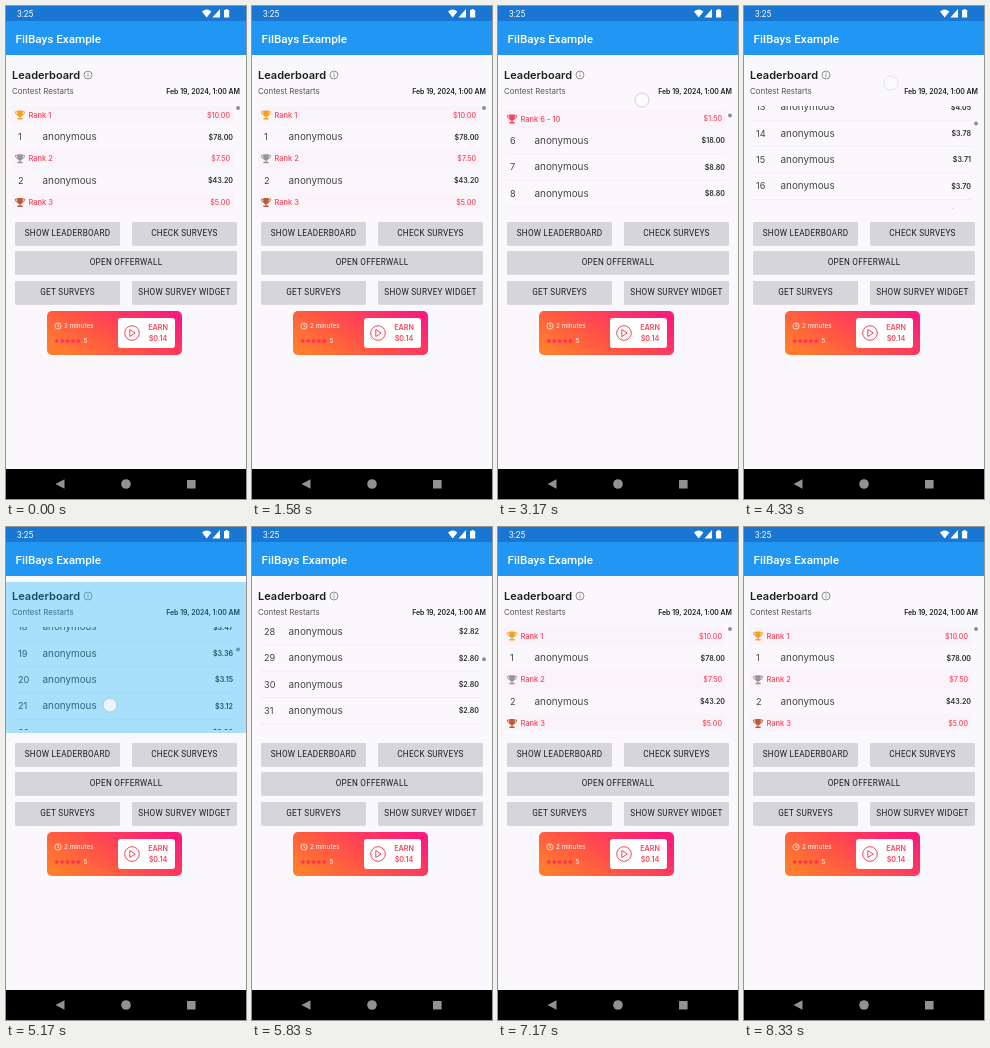
An HTML page for the animation above (8.41 s loop, 240x493 px).

```html
<!DOCTYPE html>
<html lang="en">
<head>
<meta charset="utf-8">
<title>Leaderboard</title>
<style>
@property --s { syntax: "<number>"; inherits: true; initial-value: 0; }
html, body { margin: 0; width: 100%; height: 100%; overflow: hidden; background: #faf8fd; }
svg { display: block; width: 240px; height: 493px; font-family: Inter, "Open Sans", sans-serif; }
.roboto { font-family: Roboto, sans-serif; }
.end { text-anchor: end; }
.mid { text-anchor: middle; }
.bold { font-weight: 600; }

#board, #press, #touch { animation: 8410ms linear infinite; }
#board { animation-name: scroll; }
#press { animation-name: press; }
#touch { animation-name: touch; }
#list { transform: translateY(calc(var(--s) * -1px)); }
#thumb { transform: translateY(calc(var(--s) * .0375px)); }

/* drag, then fling with deceleration */
@keyframes scroll {
  0%, 21.4% { --s: 0; }
  23.8% { --s: 84; animation-timing-function: cubic-bezier(.15,.6,.4,1); }
  28%, 34.5% { --s: 113; }
  37.7% { --s: 197; animation-timing-function: cubic-bezier(.15,.6,.4,1); }
  45.2%, 48.5% { --s: 315; }
  51.5% { --s: 416; animation-timing-function: cubic-bezier(.15,.6,.4,1); }
  59.5%, 62.4% { --s: 549; }
  65.2% { --s: 650; animation-timing-function: cubic-bezier(.15,.6,.4,1); }
  74.3%, 77.7% { --s: 839; }
  79.7% { --s: 664; animation-timing-function: cubic-bezier(.2,.45,.6,1); }
  83%, 100% { --s: 0; }
}
@keyframes press {
  0%, 19.6% { opacity: 0; }
  21%, 21.6% { opacity: .33; }
  23%, 32.7% { opacity: 0; }
  34.1%, 34.7% { opacity: .33; }
  36.1%, 46.7% { opacity: 0; }
  48.1%, 48.7% { opacity: .33; }
  50.1%, 60% { opacity: 0; }
  61.3%, 62.6% { opacity: .33; }
  64%, 75.8% { opacity: 0; }
  77.3%, 77.7% { opacity: .25; }
  79%, 100% { opacity: 0; }
}
@keyframes touch {
  0%, 19.5% { transform: translate(104px,178px); opacity: 0; }
  20%, 21.4% { transform: translate(104px,178px); opacity: 1; }
  23.8% { transform: translate(142px,94px); opacity: 1; }
  25%, 32.6% { transform: translate(145px,82px); opacity: 0; }
  32.61% { transform: translate(106px,178px); opacity: 0; }
  33.1%, 34.5% { transform: translate(106px,178px); opacity: 1; }
  37.7% { transform: translate(144px,94px); opacity: .8; }
  38.9%, 46.6% { transform: translate(148px,80px); opacity: 0; }
  46.61% { transform: translate(106px,178px); opacity: 0; }
  47.1%, 48.5% { transform: translate(106px,178px); opacity: 1; }
  50.8% { transform: translate(145px,84px); opacity: .9; }
  51.5% { transform: translate(147px,77px); opacity: .4; }
  52.2%, 59.8% { transform: translate(148px,74px); opacity: 0; }
  59.81% { transform: translate(104px,178px); opacity: 0; }
  60.4%, 62.4% { transform: translate(104px,178px); opacity: 1; }
  65.2% { transform: translate(145px,78px); opacity: .8; }
  66.3%, 75.6% { transform: translate(148px,70px); opacity: 0; }
  75.61% { transform: translate(118px,189px); opacity: 0; }
  76.2%, 77.7% { transform: translate(118px,189px); opacity: 1; }
  79.7% { transform: translate(126px,364px); opacity: .8; }
  80.9%, 100% { transform: translate(127px,370px); opacity: 0; }
}
</style>
</head>
<body>
<svg viewBox="0 0 240 493">
  <defs>
    <linearGradient id="warm" x1="0" y1=".75" x2="1" y2=".25">
      <stop offset="0" stop-color="#ff7d2c"/>
      <stop offset=".45" stop-color="#ff5148"/>
      <stop offset="1" stop-color="#fc1c7c"/>
    </linearGradient>
    <clipPath id="view"><rect y="100" width="240" height="103"/></clipPath>
    <filter id="shade" x="-5%" y="-10%" width="110%" height="130%">
      <feDropShadow dx="0" dy=".8" stdDeviation=".7" flood-opacity=".3"/>
    </filter>
    <g id="cup">
      <path d="M-2.8-4.5h5.6v3.4a2.8 2.8 0 0 1-5.6 0zM-.6 1h1.2v2h2v1.5h-5.2V3h2z"/>
      <path d="M-2.8-3.3h-1.8q0 3.1 2.3 3.3M2.8-3.3h1.8q0 3.1-2.3 3.3" fill="none" stroke="currentColor" stroke-width=".9"/>
    </g>
    <path id="star" d="M0-2.7.7-.9 2.6-.8 1.1.4 1.6 2.2 0 1.2-1.6 2.2-1.1.4-2.6-.8-.7-.9z"/>
  </defs>

  <rect width="240" height="493" fill="#faf8fd"/>

  <g class="roboto" fill="#fff" font-weight="500">
    <rect width="240" height="15" fill="#1976d2"/>
    <rect y="15" width="240" height="34" fill="#2196f3"/>
    <text x="11" y="10.8" font-size="8.4" font-weight="400">3:25</text>
    <path d="M196 5.4q4.7-4 9.4 0l-4.7 6zM214 3v8.4h-7.6zM218 4h1.6v-1h2v1h1.6v7.5h-5.2z"/>
    <text x="9.5" y="37" font-size="11.7">FilBays Example</text>
  </g>

  <g id="board">
    <text class="bold" x="6" y="73" font-size="11" fill="#1d1d22">Leaderboard</text>
    <g fill="none" stroke="#77757c" stroke-width=".8">
      <circle cx="82" cy="69" r="4"/>
      <path d="M82 68.4v2.8M82 66.4v1"/>
    </g>
    <text x="6" y="88" font-size="7.9" fill="#55535a">Contest Restarts</text>
    <text class="bold end" x="234" y="87.6" font-size="6.95" fill="#1d1d22">Feb 19, 2024, 1:00 AM</text>
    <g clip-path="url(#view)"><g id="list"></g></g>
    <circle id="thumb" cx="232" cy="102" r="2" fill="#918f95"/>
  </g>
  <rect id="press" y="55" width="240" height="151" fill="#03a9f4" opacity="0"/>

  <g id="buttons" class="roboto mid" font-size="8.17" letter-spacing=".28"></g>

  <g>
    <rect x="41" y="305" width="135" height="44" rx="5" fill="url(#warm)"/>
    <rect x="112" y="312" width="57" height="30" rx="3" fill="#fff"/>
    <g fill="none" stroke="#f8455c" stroke-width="1" stroke-linejoin="round">
      <circle cx="126" cy="327" r="7.3"/>
      <path d="M123.8 323.5v7l5.4-3.5z"/>
    </g>
    <g class="bold mid" fill="#f8455c" font-size="7.2">
      <text x="152" y="323.7">EARN</text>
      <text x="152" y="335">$0.14</text>
    </g>
    <g fill="none" stroke="#fff" stroke-width=".7">
      <circle cx="52" cy="320" r="3.1"/>
      <path d="M52 318v2.2l1.4.8"/>
    </g>
    <g fill="#fff" font-size="6.4">
      <text x="58" y="322.3">2 minutes</text>
      <text x="77.5" y="337.3">5</text>
    </g>
    <g id="stars" fill="#fb2f5e"></g>
  </g>

  <rect y="463" width="240" height="30"/>
  <g fill="#929292">
    <path d="M49.5 478l9-4.8v9.6z"/>
    <circle cx="120" cy="478" r="4.8"/>
    <rect x="181" y="474" width="8.6" height="8.6" rx=".6"/>
  </g>

  <g id="touch" opacity="0">
    <circle r="7" fill="#fff" fill-opacity=".7" stroke="#b9b7bd" stroke-width=".8"/>
  </g>
</svg>
<script>
const $ = id => document.getElementById(id);
const RED = '#f8455c';
const tiers = {
  1: ['1', '10.00', '#f3a321'],
  2: ['2', '7.50', '#97959a'],
  3: ['3', '5.00', '#bd5a3a'],
  4: ['4 - 5', '2.50', RED],
  6: ['6 - 10', '1.50', RED]
};
const scores = ('78.00 43.20 20.16 18.00 18.00 18.00 8.80 8.80 7.20 6.30 5.04 4.50 ' +
  '4.05 3.78 3.71 3.70 3.60 3.47 3.36 3.15 3.12 3.08 3.02 2.98 2.94 2.90 ' +
  '2.85 2.82 2.80 2.80 2.80 2.75 2.70 2.64 2.60').split(' ');

const tierRow = (y, [label, prize, color]) => `
  <rect x="6" y="${y - 9}" width="222" height="18" fill="#ff3c64" opacity=".025"/>
  <use href="#cup" x="14" y="${y}" fill="${color}" color="${color}"/>
  <g fill="${RED}" font-weight="500">
    <text x="22.5" y="${y + 2.7}" font-size="7.5">Rank ${label}</text>
    <text class="end" x="224" y="${y + 2.6}" font-size="7.1">$${prize}</text>
  </g>`;

const scoreRow = (y, n, score) => `
  <text x="12" y="${y + 3.3}" font-size="9.2" fill="#46444b">${n}</text>
  <text x="36.5" y="${y + 3.2}" font-size="9.9" fill="#46444b">anonymous</text>
  <text class="bold end" x="227" y="${y + 2.6}" font-size="7.1" fill="#2b2a30">$${score}</text>`;

let y = 109, rows = '';
scores.forEach((score, i) => {
  const n = i + 1;
  if (tiers[n]) {
    rows += tierRow(y, tiers[n]);
    y += 21.9;
  }
  rows += scoreRow(y, n, score);
  if (tiers[n + 1]) {
    y += 21.8;
  } else {
    rows += `<path d="M8 ${y + 13.2}h220" stroke="#e9e7ed" stroke-width=".6"/>`;
    y += 26.4;
  }
});
$('list').innerHTML = rows;

$('buttons').innerHTML = [
  [9, 216, 105, 'SHOW LEADERBOARD'],
  [126, 216, 105, 'CHECK SURVEYS'],
  [9, 245, 222, 'OPEN OFFERWALL'],
  [9, 275, 105, 'GET SURVEYS'],
  [126, 275, 105, 'SHOW SURVEY WIDGET']
].map(([x, top, w, label]) => `
  <rect x="${x}" y="${top}" width="${w}" height="22.5" rx="1.2" fill="#d6d5d7" filter="url(#shade)"/>
  <text x="${x + w / 2}" y="${top + 14.4}" fill="#1c1b1f">${label}</text>`).join('');

$('stars').innerHTML = [0, 1, 2, 3, 4]
  .map(i => `<use href="#star" x="${50.8 + i * 5.4}" y="335"/>`).join('');
</script>
</body>
</html>
```
